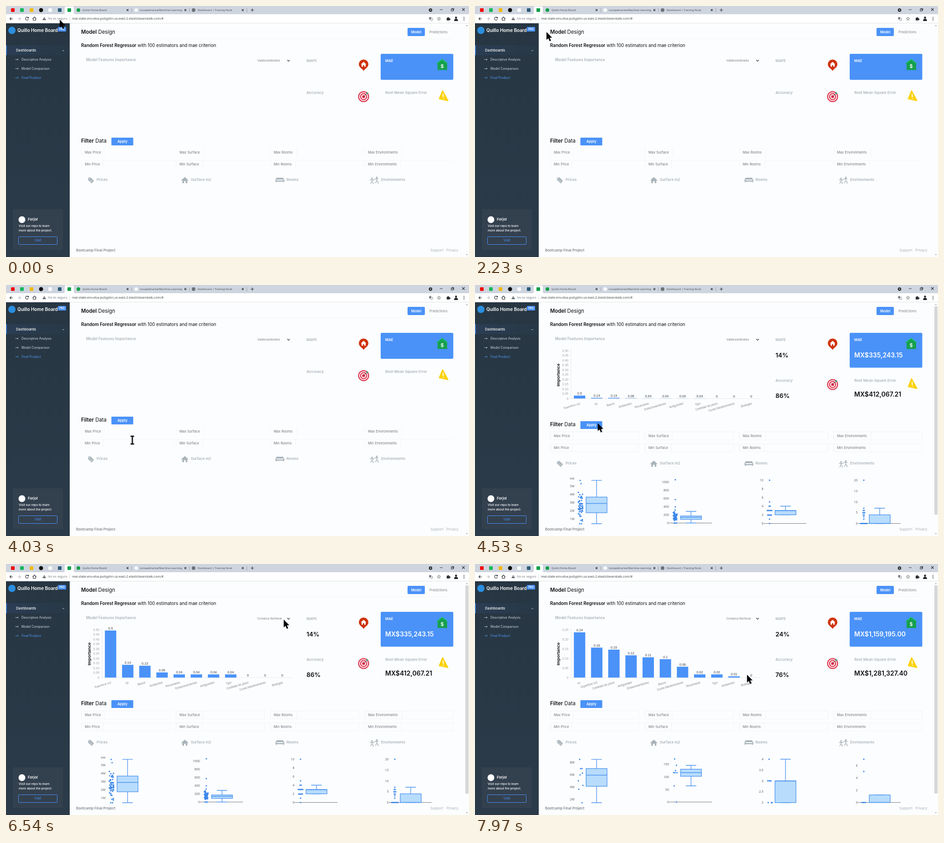
These frames come from a looping animation (1017 px wide and 551 px high, 8 s). An HTML page:

```html
<!DOCTYPE html>
<html lang="en">
<head>
<meta charset="utf-8">
<title>Model Design</title>
<style>
html, body { margin: 0; width: 100%; height: 100%; overflow: hidden; background: #fcfdfe; }
svg { display: block; width: 1017px; height: 551px; font-family: Inter, sans-serif; }
svg svg { width: auto; height: auto; }
text { white-space: pre; }
.ui { font-family: "Open Sans", sans-serif; }
.plain { font-family: "Liberation Sans", Arial, sans-serif; }
.bar { transform-box: fill-box; transform-origin: bottom; fill: #4a92f8; }
.muted { fill: #a9b4ba; }
.line { fill: none; stroke: #33373b; stroke-width: 1.2; }
</style>
</head>
<body>
<svg id="stage" viewBox="0 0 1017 551"></svg>
<script>
const LOOP = 8000, LOADED = 4400, SWITCHED = 6960, GROW = 800;
const BLUE = '#4a92f8', MUTED = '#aab3ba', INK = '#0d0f11', PAGE = '#fcfdfe';

const text = (x, y, str, size, fill = INK, extra = '') =>
  `<text x="${x}" y="${y}" font-size="${size}" fill="${fill}" ${extra}>${str}</text>`;
const rect = (x, y, w, h, fill, extra = '') =>
  `<rect x="${x}" y="${y}" width="${w}" height="${h}" fill="${fill}" ${extra}/>`;
const circle = (x, y, r, fill) => `<circle cx="${x}" cy="${y}" r="${r}" fill="${fill}"/>`;
const path = (d, extra = 'class="line"') => `<path d="${d}" ${extra}/>`;
const stroke = (color, width) => `fill="none" stroke="${color}" stroke-width="${width}"`;
const group = (id, body) => `<g id="${id}">${body}</g>`;
const clip = (x, y, w, h, body) =>
  `<clipPath id="clip${x}-${y}-${w}">${rect(x, y, w, h, '#000')}</clipPath><g clip-path="url(#clip${x}-${y}-${w})">${body}</g>`;
const bold = 'font-weight="600"', medium = 'font-weight="500"', ui = 'class="ui"', plain = 'class="plain"';
const right = 'text-anchor="end"', middle = 'text-anchor="middle"';

let seed = 7;
const random = () => (seed = seed * 16807 % 2147483647) / 2147483647;

function browser() {
  const pinned = [[15, '#f00f0f'], [35, '#14b85a'], [56, '#f2b90f'], [97, '#f8f9fa'], [118, '#2e5d7b'], [139, '#12a04b']];
  const tabs = [[159, 168, 'Quillo Home Board', '#12a04b', 267],
    [286, 294, 'lunopelmarive/Machine-Learning', '#f8f9fa', 394],
    [412, 421, 'Dashboard | Training Nook', '#6d7276', 520]];
  return rect(0, 0, 1017, 18, '#cfd5df') + rect(0, 18, 1017, 19, '#fff') + rect(0, 37, 1017, 1, '#dfe2e5')
    + path('M126 18Q129 18 129 15V4Q129 1 132 1H146Q149 1 149 4V15Q149 18 152 18Z', 'fill="#fff"')
    + pinned.map(([x, color]) => rect(x - 4, 5, 8, 8, color, 'rx="1"')).join('') + circle(77, 9, 4.5, '#111')
    + tabs.map(([iconX, x, label, color, close]) => circle(iconX, 9, 4, color)
      + clip(x, 0, 93, 18, text(x, 11.2, label, 6, '#3f4347', ui))
      + path(`M${close - 2} 7l4 4m0-4l-4 4`) + rect(close + 8.5, 5, 0.8, 9, '#8f949a')).join('')
    + path('M537.5 9h7M541 5.5v7M953 8h6M978 7h4v4h-4zM979.5 7v-1.5h4v4h-1.5M1002 5l5.5 5.5m0-5.5l-5.5 5.5')
    + circle(932.5, 9, 3.8, '#2a2d30') + path('M930.8 8.2h3.4l-1.7 2.3z', 'fill="#fff"')
    + path('M15 28H8.5m3-3l-3 3 3 3M49 26a3.3 3.3 0 1 0 .2 3M49.5 24v2.5h-2.6M58.5 28l4-3.8 4 3.8M59.8 27v4.5h5.4V27')
    + path('M25.5 28h6.5m-3-3l3 3-3 3', stroke('#b9bdc1', 1.2))
    + path('M84 24l4 7h-8z', 'fill="#62676c"') + rect(83.6, 26.2, 0.8, 2.5, '#fff')
    + text(92, 30.3, 'No es seguro', 7, '#73777b', ui) + rect(139.5, 23.5, 0.8, 9, '#c8cbcf')
    + text(145, 30.3, 'real-state-env.eba-putiyphn.us-east-2.elasticbeanstalk.com/#', 7.1, '#3b3f43', ui)
    + rect(929.5, 24.5, 4.5, 5, '#73787d') + path('M933 27h4v4.5h-4z', 'fill="#fff" stroke="#73787d" stroke-width=".8"')
    + path('M951 24.3l1 2.5 2.7.2-2.1 1.7.7 2.6-2.3-1.4-2.3 1.4.7-2.6-2.1-1.7 2.7-.2z', stroke('#555a5e', 0.8))
    + path('M968 26h2a1.3 1.3 0 1 1 2.5 0h2v2a1.3 1.3 0 1 1 0 2.2v1.6h-6.5z', 'fill="#2b2f33"')
    + circle(988.5, 25.5, 2.2, '#22262a') + path('M984.2 33q0-5 4.3-5t4.3 5z', 'fill="#22262a"')
    + [25, 28, 31].map(y => circle(1006, y, 0.9, '#33373b')).join('');
}

function sidebar() {
  const links = [[120, 'Descriptive Analysis', '#d4dbe1'], [140, 'Model Comparison', '#d4dbe1'], [160, 'Final Product', '#4f9cf9']];
  return rect(0, 38, 140, 513, 'url(#side)') + circle(13, 53.5, 8, '#2b8ede')
    + text(25, 57, 'Quillo Home Board', 9.9, '#fff', bold)
    + rect(114, 46, 18, 10, BLUE, 'rx="1.5"') + text(123, 53.2, 'PRO', 5.6, '#fff', `${bold} ${middle}`)
    + rect(0, 86, 140, 22, 'url(#active)') + rect(0, 86, 1.5, 22, BLUE)
    + text(22, 99.8, 'Dashboards', 7.7, '#fff', medium)
    + path('M124 99l1.9-1.9 1.9 1.9', stroke('#dfe5ea', 0.9))
    + links.map(([y, label, color]) => text(34, y, label, 6.9, color)
      + path(`M20.5 ${y - 2.5}h6.5m-2-1.7l2 1.7-2 1.7`, stroke(color, 0.8))).join('')
    + rect(15, 446, 110, 90, '#33404e', 'rx="3"') + circle(35, 469, 7.5, '#fff')
    + text(48, 471, 'Forjol', 8, '#fff', bold)
    + text(28, 485.2, 'Visit our repo to learn', 6.6, '#fff', medium)
    + text(28, 494.8, 'more about the project.', 6.6, '#fff', medium)
    + rect(27.5, 506.5, 85, 17, 'none', `rx="1" stroke="${BLUE}"`)
    + text(69.8, 517.2, 'Visit', 7.4, BLUE, middle);
}

function header() {
  return text(165, 61, `<tspan ${bold}>Model</tspan> Design`, 11.4) + rect(165, 72, 817, 0.8, '#f1f4f5')
    + rect(882, 48, 38, 18, BLUE, 'rx="2"') + text(901, 59.7, 'Model', 7.4, '#fff', `${bold} ${middle}`)
    + text(930, 59.7, 'Predictions', 7.5, '#7d8388')
    + text(165, 89.8, `<tspan ${bold}>Random Forest Regressor</tspan> with 100 estimators and mae criterion`, 9.75)
    + text(176, 121, 'Model Features Importance', 8.25, MUTED, bold)
    + group('firstPlace', text(552, 122, 'Valdesombrales', 6.6, '#73797f'))
    + group('secondPlace', text(552, 122, 'Comarca Norteval', 6.3, '#73797f'))
    + path('M617.8 118.5l2.8 2.8 2.8-2.8')
    + text(154, 539.3, 'Bootcamp Final Project', 7.75, '#82898f', bold)
    + text(932, 539.3, 'Support', 7.6, MUTED) + text(967, 539.3, 'Privacy', 7.6, MUTED)
    + path('M1010.5 44l1.8-2 1.8 2zM1010.5 545l1.8 2 1.8-2z', 'fill="#85898d"');
}

function cards() {
  const rings = [[12, '#dc2f4a'], [9.8, '#fff'], [7.8, '#dc2f4a'], [5.5, '#fff'], [3.3, '#dc2f4a']];
  return text(660, 123, 'MAPE', 7.8, MUTED, bold)
    + path('M785.5 142.5C782 137 775 134.5 775 128a10.5 10.5 0 0 1 21 0C796 134.5 789 137 785.500 142.5z', 'fill="#cf3410"')
    + path('M779.5 128.3l6-5.8 6 5.8h-1.6v5h-3v-3.2h-2.8v3.2h-3v-5z', 'fill="#fff"')
    + rect(823, 105, 159.5, 57, BLUE, 'id="card" rx="2.5"')
    + text(833, 122.8, 'MAE', 7.8, '#fff', bold)
    + path('M947 125.5L958 117l11 8.5v2V140.5h-21V127.500H947z', 'fill="#17a04f"')
    + path('M946.5 126L958 117l11.5 9', stroke('#19c26b', 1.6))
    + text(958, 135.5, '$', 11, '#fff', `${bold} ${middle}`)
    + group('metrics', text(660, 193, 'Accuracy', 8.2, MUTED, bold) + text(833, 193, 'Root Mean Square Error', 8, MUTED, bold)
      + rings.map(([r, color]) => circle(785.5, 199, r, color)).join('')
      + path('M785.5 199l7.5-7.500', stroke('#34474b', 1)) + path('M791 192l2.5-4 .8 2.4 2.7.6-4 2.5z', 'fill="#36a67e"')
      + path('M959 186.5L952 203.500L970.5 207.500Z', 'fill="#fbd20c" stroke="#fbd20c" stroke-width="2.5" stroke-linejoin="round"')
      + path('M960 192.5l.5 7.5', stroke('#fff', 2)) + circle(961, 203, 1.1, '#fff'));
}

function filters() {
  const names = ['Price', 'Surface', 'Rooms', 'Environments'];
  const labels = ['Prices', 'Surface m2', 'Rooms', 'Environments'];
  const lefts = [165.5, 373.5, 580.5, 787.5], labelX = [199, 406, 616, 824];
  const dividers = [[215, 213], [433, 431], [638, 636], [869, 867]];
  const tops = [312.5, 338.5];
  const edge = '#eff1f5';
  const outlines = lefts.map(x => tops.map(y => rect(x, y, 194.5, 17.5, PAGE, `rx="2" stroke="${edge}" stroke-width=".9"`)).join('')).join('');
  const field = (i, row) => rect(dividers[i][row], tops[row], 0.8, 17.5, edge) + rect(lefts[i], tops[row], 0.8, 15, edge)
    + text(lefts[i] + 7.5, tops[row] + 11.3, `${row ? 'Min' : 'Max'} ${names[i]}`, 7.5, '#6d747a');
  const icons = path('M180 377l5.5-.8 7.7 7.5-4.7 6-8-7.5z', 'class="muted"') + circle(182.5, 379, 1, '#fff')
    + path('M183 383l6 5M185 381l6 5', stroke('#fff', 0.6))
    + path('M385 382.5l7.8-7 7.8 7-1 1-1.3-1V389h-3.5v-4.5h-3.8v4.5h-3.7v-6.5l-1.5 1z', 'class="muted"')
    + path('M593.5 381v-3q0-1 1-1h14q1 0 1 1v3zM592 380.5h2.2v2.5h15v-2.5h2.2v5h-1v1.7h-1.5v-1.7h-14.5v1.7h-1.5v-1.7h-1z', 'class="muted"')
    + circle(804, 378.5, 1.7, MUTED) + circle(814.5, 376.2, 1.7, MUTED)
    + path('M799.5 382l4-1 3.5 1.5 2-2.5M804 381l-.5 4.5 3 2v3.5M803.5 385.5l-2.5 4.5M810 380l4-1.5 4 1.5M814 379l.5 5 2.5 2 .5 4M814 384l-2.5 5', stroke(MUTED, 1.5));
  return text(165, 299.7, `<tspan ${bold}>Filter</tspan> Data`, 11.4)
    + rect(231.5, 289, 48, 17, BLUE, 'rx="1"') + text(255.7, 300.2, 'Apply', 7.8, '#fff', `${bold} ${middle}`)
    + rect(165.5, 338.5, 817, 0.8, '#f5f6f9') + group('outlines', outlines)
    + lefts.map((_, i) => field(i, 0) + field(i, 1) + text(labelX[i], 384.2, labels[i], 8, MUTED, bold)).join('') + icons;
}

function barChart({ ticks, names, values, heights }) {
  let out = rect(210.5, 139, 0.8, 110.5, '#e3e6e9') + rect(210.5, 249.2, 417, 0.8, '#e3e6e9')
    + text(0, 0, 'Importance', 9.3, INK, `${plain} font-weight="700" ${middle} transform="translate(186 197.5) rotate(-90)"`);
  for (let i = 0; i <= ticks; i++)
    out += text(205, 251.6 - i * 105 / ticks, i ? (i * 0.05).toFixed(2) : 0, 6.8, '#9aa0a5', `${plain} ${right}`);
  names.forEach((name, i) => {
    const x = 229.7 + 37.7 * i, h = heights[i] || 0;
    out += text(0, 0, name, 6.3, '#858a8f', `${plain} ${right} transform="translate(${x + 2} 262) rotate(-16)"`);
    if (h) out += rect(x - 12.5, 249.3 - h, 25, h, BLUE, 'class="bar"');
    out += `<g class="value" data-h="${h}">${text(x, 246.8 - h, values[i], 7.2, '#34393e', `${plain} ${middle}`)}</g>`;
  });
  return out;
}

// box: top, median, bottom, upper whisker, lower whisker
function boxPlot(cx, { labels, y, gap, box: [top, mid, bottom, high, low], dots, zero }) {
  const pen = stroke('#4a93ee', 1.3);
  return labels.map((label, i) => text(cx - 48.5, y + i * gap + 2.6, label, 7, '#54585c', `${ui} ${right}`)).join('')
    + (zero ? rect(cx - 48, zero - 0.5, 94, 1, '#76797c') : '')
    + path(`M${cx} ${high}V${top}M${cx} ${bottom}V${low}M${cx - 11.5} ${high}h23M${cx - 11.5} ${low}h23`, pen)
    + rect(cx - 23, top, 46, bottom - top, '#b8dcfc', 'stroke="#4a93ee" stroke-width="1.3"')
    + path(`M${cx - 23} ${mid}h46`, pen)
    + dots.map(([dx, dy]) => circle(cx + dx, dy, 1.6, '#3b87ea')).join('');
}

const row = (y, ...xs) => xs.map(x => [x, y]);
const run = (y, from, count) => Array.from({ length: count }, (_, i) => [from + 2 * i, y]);
const cloud = (count, spread, top, height) => Array.from({ length: count }, () =>
  [-35 + (random() - 0.5) * spread, top + height * (random() + random()) / 2]);

const firstData = {
  bars: { ticks: 10,
    names: ['Superficie m2', 'cp', 'Banos', 'Ambientes', 'Recamaras', 'Estacionamientos', 'Antiguedad', 'Tipo', 'Cantidad de pisos', 'Cuota Mantenimiento', 'Bodegas'],
    values: [0.5, 0.14, 0.13, 0.06, 0.04, 0.04, 0.04, 0.04, 0, 0, 0], heights: [103.3, 28, 26, 11.3, 7, 7, 7, 7] },
  metrics: ['14%', '86%', 'MX$335,243.15', 'MX$412,067.21'],
  plots: [
    { labels: ['6M', '5M', '4M', '3M', '2M', '1M'], y: 424, gap: 17.8, box: [465.5, 479.5, 500, 428.8, 524],
      dots: [[-36, 429], [-34, 436], ...cloud(50, 10, 442, 82), ...row(524, -37, -33)] },
    { labels: [1000, 800, 600, 400, 200, 0], y: 432, gap: 18.1, box: [507, 510, 514.5, 497, 522.5], zero: 522.5,
      dots: [[-34.5, 427.5], [-34.5, 471], [-34.5, 487], [-35, 494], ...cloud(42, 8, 498, 19), ...row(522.5, -37, -35, -32)] },
    { labels: [10, 8, 6, 4, 2, 0], y: 428.5, gap: 19, box: [495, 495.5, 504.5, 485.5, 504.5], zero: 523.5,
      dots: [[-35, 428.5], [-35, 476], ...row(485.5, -36, -33.5), ...run(495, -40, 6), ...run(505, -39, 5), [-35, 514], [-35, 523.5]] },
    { labels: [20, 15, 10, 5, 0], y: 428.5, gap: 23.75, box: [504.5, 523.5, 523.5, 490, 523.5], zero: 523.5,
      dots: [[-35, 428.5], [-35, 490], ...run(495, -36, 2), ...run(500, -37, 3), ...run(505, -36, 2), [-35, 509], [-35, 514], ...run(523.5, -42, 8)] }]
};
const secondData = {
  bars: { ticks: 5,
    names: ['cp', 'Superficie m2', 'Cantidad de pisos', 'Antiguedad', 'Estacionamientos', 'Banos', 'Cuota Mantenimiento', 'Recamaras', 'Tipo', 'Ambientes', 'Bodegas'],
    values: [0.24, 0.16, 0.15, 0.12, 0.11, 0.1, 0.06, 0.02, 0.02, 0.01, 0], heights: [99.3, 65.8, 61.3, 48.8, 44.5, 40.3, 23.8, 7, 7, 2.8] },
  metrics: ['24%', '76%', 'MX$1,159,195.00', 'MX$1,281,327.40'],
  plots: [
    { labels: ['8M', '6M', '4M', '2M'], y: 435, gap: 27, box: [449, 463.5, 488, 428.8, 524],
      dots: [[-37, 429], ...row(449, -35, -32), [-31, 459], [-36, 463], [-40, 476], [-30, 486], [-39, 494.5], [-32, 524]] },
    { labels: [150, 100, 50, 0], y: 439.5, gap: 27.7, box: [450.5, 458, 466, 442, 487], zero: 522.5,
      dots: [[-36, 428], [-32, 442], [-34, 453.5], ...row(458, -38, -35, -31), [-37, 487], [-32, 522.5]] },
    { labels: [4, 3.5, 3, 2.5, 2], y: 428.5, gap: 23.75, box: [476, 476.5, 523.8, 428.5, 523.8],
      dots: [[-36, 428.5], ...row(476, -39, -36, -34, -32), ...row(523.8, -38, -31, -29)] },
    { labels: [6, 4, 2, 0], y: 442, gap: 27.2, box: [507, 523.5, 523.5, 507, 507], zero: 523.5,
      dots: [[-35, 428.5], [-35, 455.5], ...row(523.5, -39, -36, -34, -31)] }]
};

function results({ bars, metrics, plots }) {
  const spots = [[660, 158.8, INK], [660, 248.3, INK], [833, 158.8, '#fff'], [833, 244.5, INK]];
  const centers = [267, 474.5, 682, 889];
  return clip(0, 138.5, 640, 145, barChart(bars))
    + metrics.map((m, i) => text(spots[i][0], spots[i][1], m, i < 2 ? 13.6 : 14, spots[i][2], bold)).join('')
    + clip(0, 423, 1017, 128, plots.map((plot, i) => boxPlot(centers[i], plot)).join(''));
}

const gradient = (id, from, to, dir) =>
  `<linearGradient id="${id}" x1="0" y1="0" x2="${dir[0]}" y2="${dir[1]}"><stop stop-color="${from}"/><stop offset="1" stop-color="${to}"/></linearGradient>`;

document.getElementById('stage').innerHTML =
  `<defs>${gradient('side', '#273642', '#2b3b49', [0, 1])}${gradient('active', '#2a3d54', '#283845', [1, 0])}</defs>`
  + rect(0, 0, 1017, 551, PAGE) + browser() + sidebar() + header() + cards() + group('filters', filters())
  + group('thumb', rect(1009, 47, 7, 457, '#d5d7d9'))
  + group('first', results(firstData)) + group('second', results(secondData))
  + group('cursor', group('arrow', path('M0 0V17.3L4 13.7L6.8 20.3L9.8 19L7 12.6H12.3Z', 'fill="#000"'))
    + group('beam', path('M-4 -8.5H4M-4 8.5H4M0 -8.5V8.5', stroke('#000', 2.6))));

const $ = id => document.getElementById(id);

// steps: [ms, style, easing until the next step]
function play(el, steps) {
  const frames = steps.map(([ms, style, easing = 'linear']) => ({ ...style, offset: ms / LOOP, easing }));
  if (steps[0][0] > 0) frames.unshift({ ...steps[0][1], offset: 0 });
  if (steps.at(-1)[0] < LOOP) frames.push({ ...steps.at(-1)[1], offset: 1 });
  el.animate(frames, { duration: LOOP, iterations: Infinity });
}
const jump = (id, before, after, ms) => play($(id), [[0, before, 'step-end'], [ms, after, 'step-end']]);
const shift = (id, dy) => jump(id, { transform: 'translateY(0px)' }, { transform: `translateY(${dy}px)` }, LOADED);
const showFrom = (id, ms) => jump(id, { opacity: 0 }, { opacity: 1 }, ms);
const hideFrom = (id, ms) => jump(id, { opacity: 1 }, { opacity: 0 }, ms);
const showBetween = (id, from, to, inside = 1) => play($(id), [[0, { opacity: 1 - inside }, 'step-end'],
  [from, { opacity: inside }, 'step-end'], [to, { opacity: 1 - inside }, 'step-end']]);

function grow(id, start) {
  const ease = 'cubic-bezier(.37,0,.63,1)', end = start + GROW;
  for (const bar of $(id).querySelectorAll('.bar'))
    play(bar, [[start, { transform: 'scaleY(0)' }, ease], [end, { transform: 'scaleY(1)' }]]);
  for (const label of $(id).querySelectorAll('.value'))
    play(label, [[start, { transform: `translateY(${label.dataset.h}px)` }, ease], [end, { transform: 'translateY(0px)' }]]);
}

shift('metrics', 19.5);
shift('filters', 10);
jump('card', { height: '57px' }, { height: '76.5px' }, LOADED);
showFrom('thumb', LOADED);
showFrom('outlines', LOADED);
showBetween('first', LOADED, SWITCHED);
showFrom('second', SWITCHED);
hideFrom('firstPlace', 6540);
showFrom('secondPlace', 6540);
grow('first', LOADED);
grow('second', SWITCHED);

const trail = [[0, 118, 30], [830, 126, 35], [1630, 126, 35], [2070, 150, 52], [2230, 157, 57], [2600, 320, 395],
  [2930, 353, 339], [3040, 300, 346], [3380, 256, 297], [3560, 257, 299], [3770, 277.5, 340.5], [4100, 277.5, 340.5],
  [4700, 268, 296], [4800, 268, 296], [5300, 606, 108], [5470, 610, 120.5], [7170, 610, 122.5], [7400, 610, 123], [7960, 597.5, 243]];
play($('cursor'), trail.map(([ms, x, y]) => [ms, { transform: `translate(${x}px, ${y}px)` }, 'ease-in-out']));
showBetween('beam', 3680, 4300);
showBetween('arrow', 3680, 4300, 0);
</script>
</body>
</html>
```
